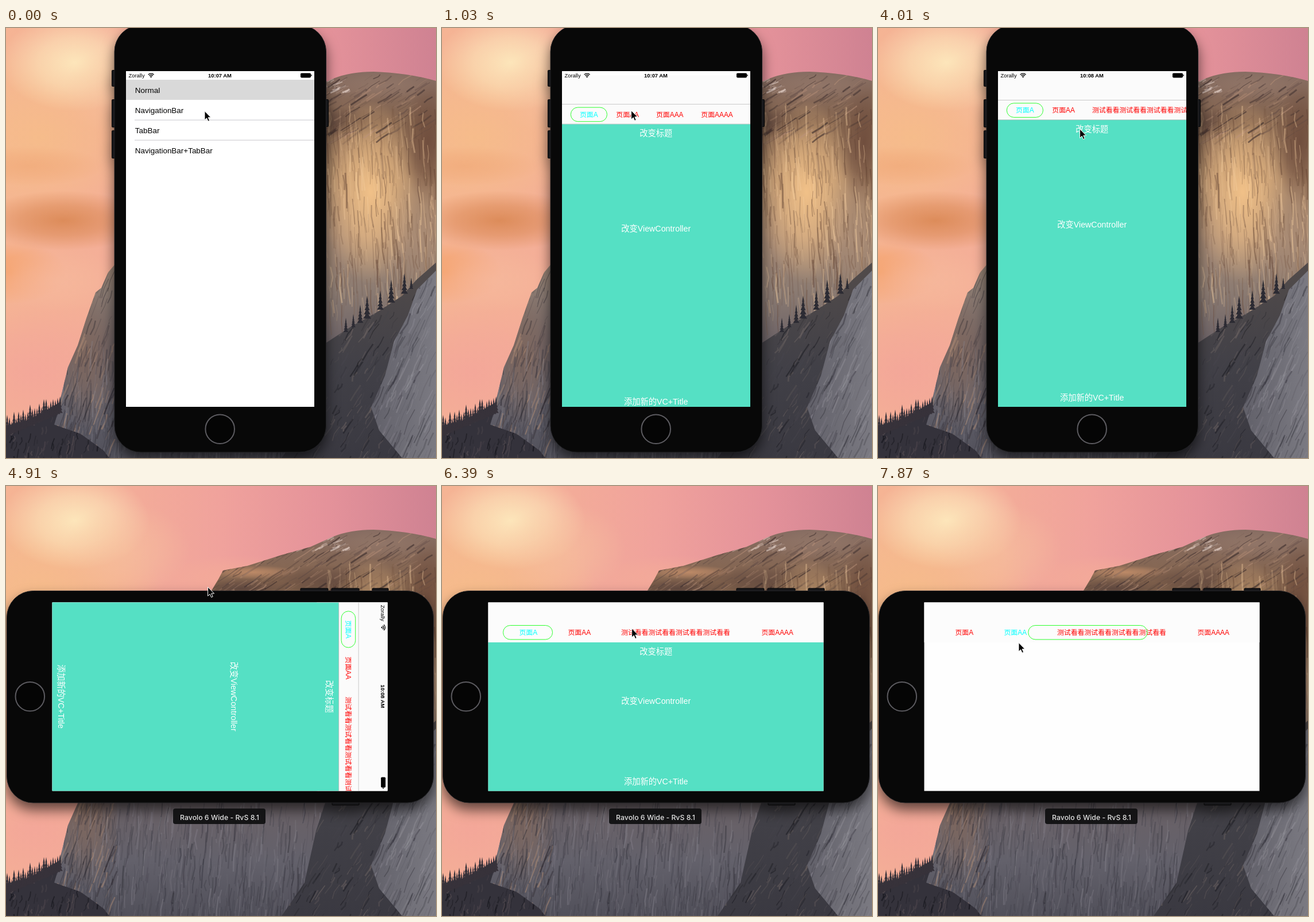
Animation, 749 px wide and 748 px high, one loop 8 s. Source, as an HTML page with a canvas:

```html
<!DOCTYPE html>
<html lang="zh">
<head>
<meta charset="utf-8">
<style>
html, body { margin: 0; width: 100%; height: 100%; overflow: hidden; }
canvas, svg { position: absolute; left: 0; top: 0; }
text { font-family: "Liberation Sans", "Noto Sans CJK SC", "Noto Sans CJK", sans-serif; white-space: pre; }
#shade { filter: drop-shadow(0 12px 11px #0009); }
.row { font-size: 13.46px; }
.tab { font-size: 11.88px; fill: #f00; }
.page { font-size: 14.25px; font-weight: 300; fill: #fff; text-anchor: middle; }
.status { font-size: 9.4px; }
.pill { fill: none; stroke: #2dff2d; }
.tip { font: 500 12.3px Inter, sans-serif; fill: #e4e4e4; text-anchor: middle; }
</style>
</head>
<body>
<canvas id="scene" width="749" height="748"></canvas>
<svg width="749" height="748" viewBox="0 0 749 748">
  <clipPath id="clip"><rect id="hole" x="209" y="75" width="328" height="584"/></clipPath>
  <g id="shade"><g id="device">
    <g fill="#17171a" stroke="#050505">
      <rect x="184.5" y="73.5" width="8" height="28" rx="1"/>
      <rect x="184.5" y="124.5" width="8" height="48" rx="1"/>
      <rect x="184.5" y="178.5" width="8" height="48" rx="1"/>
      <rect x="553.5" y="124.5" width="8" height="47" rx="1"/>
    </g>
    <rect x="189" y="-5" width="368.5" height="743" rx="46" fill="#080808" stroke="#222225"/>
    <circle cx="372.7" cy="697.7" r="25.3" fill="#050505" stroke="#5c5b60" stroke-width="2"/>
  </g></g>
  <g clip-path="url(#clip)">
    <g id="wide"></g>
    <g id="tall"></g>
  </g>
  <g id="tip">
    <rect x="291" y="561" width="161" height="27" rx="4" fill="#101012" fill-opacity=".94"/>
    <text class="tip" x="372" y="580.5">Ravolo 6 Wide - RvS 8.1</text>
  </g>
  <path id="cursor" d="M0 0V15.5L3.6 12.2 6 17.8 8.6 16.7 6.2 11.2H11Z" stroke="#fff" stroke-linejoin="round"/>
</svg>
<script>
const $ = id => document.getElementById(id);
const set = (id, attrs) => { for (const k in attrs) $(id).setAttribute(k, attrs[k]); };
const text = (cls, x, y, s, more = "") => `<text class="${cls}" x="${x}" y="${y}" ${more}>${s}</text>`;
const rect = (x, y, w, h, fill, more = "") => `<rect x="${x}" y="${y}" width="${w}" height="${h}" fill="${fill}" ${more}/>`;
const clamp = v => Math.max(0, Math.min(1, v));
const mix = (a, b, p) => a + (b - a) * p;
const ease = p => (p = clamp(p), p * p * (3 - 2 * p));

// ---- wallpaper ----
const c = $("scene").getContext("2d");
let seed = 11;
const rnd = (a = 0, b = 1) => {
  seed = (seed * 16807) % 2147483647;
  return a + (b - a) * seed / 2147483647;
};
function ramp(x0, y0, x1, y1, ...colours) {
  const g = c.createLinearGradient(x0, y0, x1, y1);
  colours.forEach((s, i) => g.addColorStop(i / (colours.length - 1), s));
  return g;
}
function glow(x, y, rx, ry, rgb, alpha) {
  c.save();
  c.translate(x, y);
  c.scale(rx, ry);
  const g = c.createRadialGradient(0, 0, 0, 0, 0, 1);
  [1, .6, 0].forEach((k, i) => g.addColorStop(i / 2, `rgba(${rgb},${alpha * k})`));
  c.fillStyle = g;
  c.fillRect(-1, -1, 2, 2);
  c.restore();
}
// strokes of rock grain inside a box
function grain(n, x0, y0, x1, y1, lean, len, tones, alpha) {
  for (let i = 0; i < n; i++) {
    const x = rnd(x0, x1), y = rnd(y0, y1), l = rnd(.3, 1) * len;
    c.strokeStyle = `rgba(${tones[i % tones.length]},${rnd(.2, 1) * alpha})`;
    c.lineWidth = rnd(.6, 3);
    c.beginPath();
    c.moveTo(x, y);
    c.lineTo(x + l * lean * .5 + rnd(-3, 3), y + l * .5);
    c.lineTo(x + l * lean + rnd(-2, 2), y + l);
    c.stroke();
  }
}
function tree(x, base, h) {
  c.beginPath();
  for (let i = 0; i < 5; i++) {
    const y = base - h + i * h / 5, w = h * (.05 + i * .035);
    c.moveTo(x, y - 2);
    c.lineTo(x + w, y + h / 4);
    c.lineTo(x - w, y + h / 4);
  }
  c.fill();
}
function within(path, fill, draw) {
  c.save();
  c.clip(new Path2D(path));
  c.fillStyle = fill;
  c.fillRect(0, 0, 749, 748);
  draw();
  c.restore();
}
function wallpaper() {
  c.fillStyle = ramp(0, 0, 749, 0, "#f5b494", "#f4ae98", "#f0a29c", "#e4929a", "#cf8292");
  c.fillRect(0, 0, 749, 748);
  glow(60, 190, 210, 160, "246,190,136", .8);
  glow(120, 60, 130, 85, "253,232,188", .95);
  glow(210, 110, 110, 80, "247,198,160", .5);
  glow(40, 240, 130, 35, "238,162,112", .5);
  glow(100, 335, 150, 52, "218,136,84", .9);
  glow(5, 425, 100, 55, "245,158,98", .8);
  glow(90, 440, 120, 55, "246,184,156", .8);
  glow(50, 600, 200, 130, "243,164,154", .8);
  glow(400, 160, 130, 40, "247,178,150", .5);

  const rock = "M189 412L178 425 166 452 156 460 140 505 125 552 108 590 96 640 78 690 60 748H749V92Q700 78 640 76 600 76 570 88L530 106 480 120 420 139 378 147 370 162 358 182Z";
  within(rock, ramp(0, 70, 0, 748, "#846b62", "#86664f", "#a68365", "#a88a74", "#8b7b72", "#6a6166", "#63616b", "#51505a"), () => {
    glow(655, 100, 110, 28, "150,122,108", .7);
    glow(430, 150, 80, 12, "202,146,108", .8);
    glow(410, 178, 90, 18, "84,62,58", .7);
    glow(560, 165, 110, 28, "92,68,60", .7);
    glow(635, 285, 85, 160, "245,196,138", .95);
    glow(735, 200, 45, 110, "104,70,56", .8);
    glow(720, 360, 60, 110, "170,140,116", .5);
    glow(140, 570, 60, 130, "136,106,90", .7);
    grain(260, 360, 76, 749, 185, -1.5, 24, ["56,42,42", "186,146,122", "90,70,66"], .6);
    grain(420, 557, 130, 749, 490, .05, 70, ["90,60,46", "244,206,160", "120,90,70"], .42);
    grain(200, 70, 415, 195, 748, -.35, 46, ["42,38,44", "178,142,118", "70,62,66"], .55);
    grain(650, 100, 540, 560, 748, -.08, 60, ["46,45,54", "132,128,138", "66,64,74"], .45);
    grain(70, 480, 88, 600, 110, -2, 9, ["232,214,206"], .5);
  });
  within("M480 748L520 690 540 600 557 548 600 520 645 495 690 466 715 438 749 408V748Z",
    ramp(0, 430, 0, 748, "#504a4a", "#414047", "#3a3941"), () => {
      grain(420, 480, 430, 749, 748, -.6, 30, ["24,24,30", "112,102, 100", "70,68,76"], .55);
    });
  within("M749 422L716 455 700 500 676 545 660 605 636 660 650 700 690 748H749Z",
    ramp(640, 0, 749, 0, "#62616a", "#7b7a82"), () => {
      grain(260, 620, 420, 749, 748, -.45, 46, ["48,47,55", "150,148,156"], .45);
    });
  c.fillStyle = "#2c2b33";
  [592, 605, 617, 629, 652, 671, 694, 706].forEach((x, i) =>
    tree(x, 528 - (x - 592) * .66, [22, 20, 28, 36, 30, 36, 32, 18][i]));
  within("M0 692L40 682 96 650 84 690 130 706 170 735 180 748H0Z", "#34323b", () =>
    grain(120, 0, 650, 180, 748, -.2, 20, ["18,18,24", "92,82,86"], .6));
  c.fillStyle = "#37323a";
  for (let x = 2; x < 96; x += 4) tree(x, 708 - x * .42, rnd(18, 36));
}

// ---- phone screens ----
const longTitle = "测试看看测试看看测试看看测试看看";
function page(top, ys) {
  return ["改变标题", "改变ViewController", "添加新的VC+Title"]
    .map((s, i) => text("page", 372.7, ys[i] + 5.2, s)).join("");
}
function tabs(key, xs, y) {
  return ["页面A", "页面AA", "页面AAA", "页面AAAA"]
    .map((s, i) => text("tab", xs[i], y, s, `id="${key}${i}"`)).join("");
}
const teal = "#55e0c4";
const rows = ["Normal", "NavigationBar", "TabBar", "NavigationBar+TabBar"];

$("tall").innerHTML =
  rect(209, 75, 328, 584, "#fff") +
  rect(209, 90, 328, 35, "#d9d9d9", 'id="picked"') +
  rect(224, 159.6, 313, 1, "#c8c7cc", 'id="rule"') + rect(224, 194.6, 313, 1, "#c8c7cc") +
  rows.map((s, i) => text("row", 224.8, 112.5 + 35 * i, s)).join("") +
  '<g id="sheet">' + rect(209, 75, 328, 85, "#fbfbfb") +
  rect(209, 125, 328, .8, "#bcbcbc") + rect(209, 160, 328, 499, teal) + rect(209, 159.4, 328, .8, "#a9b5b2") +
  rect(224.3, 130.8, 63.2, 24.6, "none", 'class="pill" rx="12.3"') +
  tabs("t", [240, 303.3, 373, 451.3], 147.3) + page(160, [176, 342, 643]) + "</g>" +
  text("status", 213.5, 86.3, "Zorally") +
  text("status", 372.5, 86.3, "", 'id="clock" font-weight="bold" text-anchor="middle"') +
  `<g fill="none" stroke="#000" stroke-width="1.3"><path d="M247.6 81.3Q252.6 76.9 257.6 81.3M249.4 83.2Q252.6 80.4 255.8 83.2"/></g>
  <path d="M250.8 84.4Q252.6 83 254.4 84.4L252.6 86.4Z"/>` +
  rect(513, 78.4, 18, 8, "#000", 'rx="1.8"') + rect(531.4, 81, 1.3, 2.8, "#000", 'rx=".6"');

$("wide").innerHTML =
  rect(80, 202, 585, 329, "#fefefe") + rect(80, 202, 585, 70, "#fcfcfc") +
  '<g id="teal">' + rect(80, 272, 585, 259, teal) + page(272, [288, 374, 514]) + "</g>" +
  tabs("w", [134.5, 219.5, 312, 556.5], 258.8) +
  rect(106.5, 242.5, 86, 24.5, "none", 'id="pill" class="pill" rx="12.2"');
$("w2").textContent = longTitle;
$("t0").style.fill = "#0ff";

// ---- motion ----
const track = [
  [0, 346, 144.5], [445, 329.6, 143.5], [1040, 329.6, 143.5], [1782, 339.5, 163],
  [2079, 339.5, 163], [2673, 351.6, 175.8], [5494, 351.6, 175.8], [6088, 318.8, 222],
  [6385, 330.6, 247.8], [7128, 330.6, 247.8], [7573, 236.5, 250], [7722, 236.5, 250], [7870, 245, 272.5]
];
function pointer(t) {
  let i = track.findIndex(k => k[0] > t);
  if (i < 0) return track[track.length - 1].slice(1);
  const [a, b] = [track[i - 1], track[i]], p = (t - a[0]) / (b[0] - a[0]);
  return [mix(a[1], b[1], p), mix(a[2], b[2], p)];
}
// left edge and width of the pill under each landscape tab
const slots = [[106.5, 86], [192, 94], [285, 245]];
const around = (angle, sx, sy) =>
  `translate(373 366.5) rotate(${angle}) scale(${sx} ${sy}) translate(-373 -366.5)`;

function draw(t) {
  const turned = t >= 4890, tapped = t >= 690;
  const turn = turned ? "rotate(90 373 366.5)" : "";
  set("device", { transform: turn });
  set("hole", { transform: turn });
  $("tip").style.display = turned ? "" : "none";

  // list tap, then the sheet springs up
  set("picked", { y: tapped ? 125 : 90 });
  $("rule").style.display = tapped ? "none" : "";
  const x = Math.max(0, t - 690) * .01826;
  set("sheet", { transform: `translate(0 ${584 * (1 + x) * Math.exp(-x)})` });
  const renamed = t >= 3550;
  $("t2").textContent = renamed ? longTitle : "页面AAA";
  $("t3").style.display = renamed ? "none" : "";
  $("clock").textContent = t >= 4000 ? "10:08 AM" : "10:07 AM";

  // rotation of the interface
  const r = ease((t - 4901) / 420), k = 584 / 328, angle = 90 * (1 - r);
  set("tall", { transform: turned ? around(angle, mix(1, k, r), mix(1, 1 / k, r)) : "", opacity: turned ? 1 - r : 1 });
  set("wide", { transform: around(angle, mix(1 / k, 1, r), mix(k, 1, r)) });
  $("wide").style.display = turned ? "" : "none";

  // tab changes
  const back = t >= 7860;
  const p = back ? .25 : ease((t - 6640) / 320);
  const [from, to] = back ? [slots[2], slots[1]] : [slots[0], slots[2]];
  set("pill", { x: mix(from[0], to[0], p), width: mix(from[1], to[1], p) });
  set("teal", { transform: `translate(${back ? -1170 : -1170 * p} 0)` });
  const active = back ? 1 : t >= 6670 ? 2 : 0;
  for (let i = 0; i < 4; i++) $("w" + i).style.fill = i === active ? "#0ff" : "#f00";

  set("cursor", { transform: `translate(${pointer(t)})` });
}

wallpaper();
const beat = 148.5;
const start = performance.now();
function tick() {
  const t = (performance.now() - start) % 8000;
  draw(Math.floor((t + 10) / beat) * beat);
  requestAnimationFrame(tick);
}
tick();
</script>
</body>
</html>
```
